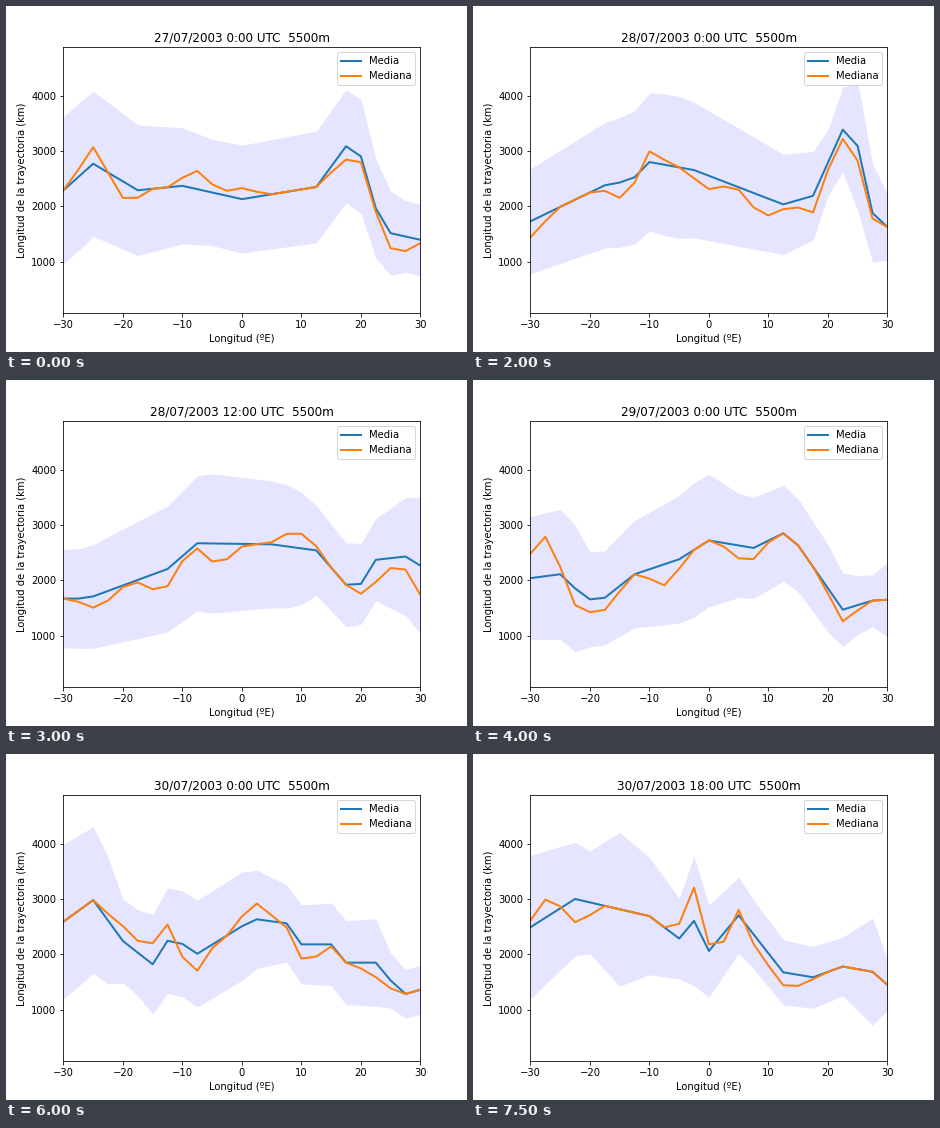
Write a matplotlib script that moves like this. It is 461x346 px and loops after 8000 ms.

```python
import numpy as np
import matplotlib.pyplot as plt
from matplotlib.animation import FuncAnimation

W, H, DPI = 461, 346, 72
STEPS, STEP_MS = 16, 500   # one step is six hours
DRIFT = 1.25               # eastward drift of features, degrees per step
KICK_WIDTH = 4.5           # half width of a median deviation, degrees

lon = np.linspace(-30, 30, 25)
obs = {}


def line(points):
    return np.interp(lon, *zip(*points))


def kink(centre, height):
    return height * np.clip(1 - abs(lon - centre) / KICK_WIDTH, 0, None)


def observe(step, mean, kicks, spread):
    """Mean and spread by turning points, median by its kicks off the mean."""
    m = line(mean)
    median = m + sum(kink(*k) for k in kicks)
    obs[step] = np.array([m, median, line(spread)])


observe(0,
        mean=[(-30, 2290), (-25, 2770), (-17.5, 2290), (-10, 2370), (0, 2130),
              (12.5, 2350), (17.5, 3085), (20.3, 2880), (23.5, 1550), (30, 1395)],
        kicks=[(-25, 300), (-20, -300), (-7.5, 330), (0, 200), (17.5, -240),
               (26.2, -370)],
        spread=[(-26, 1330), (-5, 960), (20, 1030), (27, 650)])
observe(2,
        mean=[(-30, 1990), (-20, 2570), (-17, 2540), (-12.5, 2900), (-5, 2280),
              (12, 2160), (20, 3190), (22.5, 2820), (26, 1600), (30, 1270)],
        kicks=[(-30, -300), (-24.2, 480), (-20, -370), (1, 240), (20, 250),
               (25.8, -230)],
        spread=[(-30, 935), (-14, 1400), (-3, 930), (13, 950), (20, 600),
                (22.5, 1060), (27.5, 550)])
observe(4,
        mean=[(-30, 1730), (-17.5, 2380), (-13, 2470), (-10, 2800), (-2.5, 2655),
              (12.5, 2035), (17.5, 2190), (22.5, 3385), (25, 3090), (27.5, 1880),
              (30, 1625)],
        kicks=[(-30, -290), (-14.4, -320), (-10, 200), (-0.5, -270), (9, -390),
               (17.5, -300), (24.5, -300)],
        spread=[(-30, 950), (-6, 1300), (17.5, 800), (21, 520), (25, 1170),
                (30, 600)])
observe(6,
        mean=[(-26, 1670), (-12.5, 2205), (-7.5, 2670), (5, 2650), (12.5, 2540),
              (17.5, 1920), (20, 1935), (22.5, 2370), (27.5, 2430), (30, 2265)],
        kicks=[(-24, -260), (-13.5, -400), (-4, -420), (9, 340), (22.5, -400),
               (30, -530)],
        spread=[(-28, 890), (-5, 1260), (9, 1100), (12.5, 810), (22, 710),
                (30, 1230)])
observe(8,
        mean=[(-30, 2040), (-25, 2110), (-20.5, 1650), (-17.5, 1685),
              (-12.5, 2110), (-5, 2380), (0, 2720), (7.5, 2585), (12.5, 2850),
              (15, 2630), (22.5, 1470), (28, 1650)],
        kicks=[(-28, 800), (-22.5, -300), (-17.5, -220), (-7.5, -380),
               (6, -300), (22.5, -210)],
        spread=[(-30, 1110), (-23, 1200), (-19.5, 800), (-1, 1250), (5, 940),
                (20, 790), (27, 430), (30, 670)])
observe(12,
        mean=[(-30, 2590), (-25, 2980), (-20, 2240), (-15, 1820), (-12, 2330),
              (-7.5, 2010), (2, 2640), (7.5, 2560), (10, 2180), (15, 2180),
              (17.5, 1850), (22.5, 1850), (27, 1270), (30, 1360)],
        kicks=[(-20, 270), (-13.8, 520), (-8.8, -430), (2, 320), (11, -330),
               (22.8, -280)],
        spread=[(-30, 1400), (-23.5, 1300), (-19.5, 680), (-14, 950), (0, 980),
                (7.5, 700), (22.5, 790), (25.5, 440)])
observe(15,
        mean=[(-30, 2490), (-22.5, 3000), (-10, 2690), (-5, 2285), (-2.5, 2605),
              (0, 2060), (5, 2705), (12.5, 1675), (17.5, 1585), (22.5, 1780),
              (27.5, 1685), (30, 1450)],
        kicks=[(-27, 370), (-22.2, -450), (-2.5, 600), (2.5, -330), (5, 400),
               (7.5, -350), (13.5, -300)],
        spread=[(-30, 1300), (-20, 930), (-15, 1390), (-5, 730), (-2.5, 1175),
                (0, 830), (7.5, 620), (22.5, 530), (27.5, 970), (30, 465)])


def shifted(rows, deg):
    return np.array([np.interp(lon - deg, lon, row) for row in rows])


def state(step):
    """Mean, median and spread; gaps blend the drifting neighbours."""
    if step in obs:
        return obs[step]
    a = max(k for k in obs if k < step)
    b = min(k for k in obs if k > step)
    u = (step - a) / (b - a)
    return ((1 - u) * shifted(obs[a], DRIFT * (step - a))
            + u * shifted(obs[b], -DRIFT * (b - step)))


plt.rcParams["font.family"] = "DejaVu Sans"
fig = plt.figure(figsize=(W / DPI, H / DPI), dpi=DPI)
ax = fig.add_axes([57.45 / W, 38.55 / H, 356.95 / W, 266 / H])


def draw(step):
    mean, median, spread = state(step)
    ax.clear()
    ax.fill_between(lon, mean - spread, mean + spread, color="blue", alpha=0.1, lw=0)
    ax.plot(lon, mean, color="C0", lw=2, label="Media")
    ax.plot(lon, median, color="C1", lw=2, label="Mediana")
    ax.set(xlim=(-30, 30), ylim=(65, 4870), yticks=range(1000, 5000, 1000),
           xlabel="Longitud (ºE)", ylabel="Longitud de la trayectoria (km)")
    day, quarter = divmod(step, 4)
    ax.set_title(f"{27 + day}/07/2003 {6 * quarter}:00 UTC  5500m")
    ax.legend(loc="upper right")


anim = FuncAnimation(fig, draw, frames=STEPS, init_func=lambda: draw(0),
                     interval=STEP_MS, repeat=True, repeat_delay=0)
plt.show()
```
